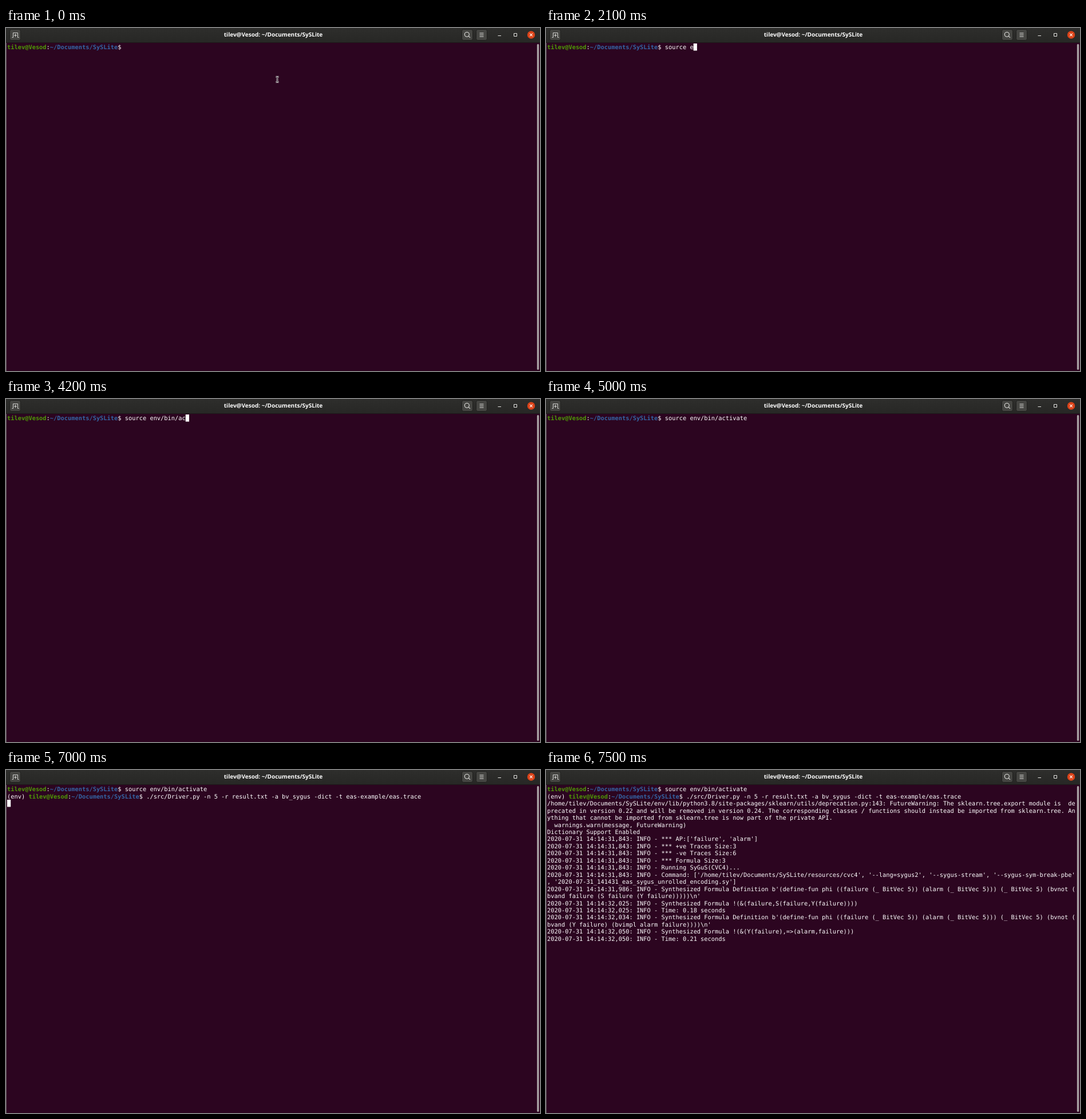
Animation of 933x600 px, one loop 8000 ms. Source, as an HTML page with a canvas:

```html
<!DOCTYPE html>
<html lang="en">
<head>
<meta charset="utf-8">
<title>Terminal</title>
<style>
html, body { margin: 0; width: 100%; height: 100%; overflow: hidden; background: #2c0520; }
canvas { display: block; }
</style>
</head>
<body>
<canvas width="933" height="600"></canvas>
<script>
const ctx = document.querySelector('canvas').getContext('2d');
ctx.textRendering = 'geometricPrecision';

const LOOP = 8000;
const CELL_W = 6.235, CELL_H = 12.46, LEFT = 2, TOP = 27.1, COLUMNS = 148;
const FONT = '10.357px "DejaVu Sans Mono", monospace';
const WHITE = '#ffffff', GREEN = '#4e9a06', BLUE = '#3465a4';

const HOST = 'tilev@Vesod', PATH = '~/Documents/SySLite', HOME = '/home/tilev/Documents/SySLite';
const ACTIVATE = 'source env/bin/activate';
const RUN = './src/Driver.py -n 5 -r result.txt -a bv_sygus -dict -t eas-example/eas.trace';

const info = (time, text) => `2020-07-31 14:14:${time}: INFO - ${text}`;
const start = text => info('31,843', text);
const definition = body => 'Synthesized Formula Definition ' +
  `b'(define-fun phi ((failure (_ BitVec 5)) (alarm (_ BitVec 5))) (_ BitVec 5) (bvnot (bvand ${body}\\n'`;
const wrap = lines => lines.flatMap(line => line.match(new RegExp(`.{1,${COLUMNS}}`, 'g')));

const startLog = wrap([
  HOME + '/env/lib/python3.8/site-packages/sklearn/utils/deprecation.py:143: FutureWarning: ' +
    'The sklearn.tree.export module is  deprecated in version 0.22 and will be removed in version 0.24. ' +
    'The corresponding classes / functions should instead be imported from sklearn.tree. ' +
    'Anything that cannot be imported from sklearn.tree is now part of the private API.',
  '  warnings.warn(message, FutureWarning)',
  'Dictionary Support Enabled',
  start("*** AP:['failure', 'alarm']"),
  start('*** +ve Traces Size:3'),
  start('*** -ve Traces Size:6'),
  start('*** Formula Size:3'),
  start('Running SyGuS(CVC4)...'),
  start(`Command: ['${HOME}/resources/cvc4', '--lang=sygus2', '--sygus-stream', ` +
    "'--sygus-sym-break-pbe', '2020-07-31_141431_eas_sygus_unrolled_encoding.sy']")
]);
const resultLog = wrap([
  info('31,986', definition('failure (S failure (Y failure)))))')),
  info('32,025', 'Synthesized Formula !(&(failure,S(failure,Y(failure))))'),
  info('32,025', 'Time: 0.18 seconds'),
  info('32,034', definition('(Y failure) (bvimpl alarm failure))))')),
  info('32,050', 'Synthesized Formula !(&(Y(failure),=>(alarm,failure)))'),
  info('32,050', 'Time: 0.21 seconds')
]);

// [time in ms, characters typed]
const keystrokes = [
  [400, 1], [500, 2], [800, 3], [1000, 4], [1100, 5], [1300, 7], [2100, 8], [2200, 9], [2400, 11],
  [2700, 12], [3100, 13], [3200, 14], [3500, 15], [4100, 16], [4200, 17], [4500, ACTIVATE.length]
];
const cursorOff = [[0, 100], [1800, 2100], [3800, 4100], [5000, 5500], [5600, 5800], [7500, LOOP]];

function fillRect(color, x, y, w, h) {
  ctx.fillStyle = color;
  ctx.fillRect(x, y, w, h);
}

function stroke(path, color, width = 1) {
  ctx.strokeStyle = color;
  ctx.lineWidth = width;
  ctx.stroke(new Path2D(path));
}

// Places text on the character grid and returns the next column.
function print(row, column, text, color = WHITE, bold = false) {
  ctx.font = (bold ? 'bold ' : '') + FONT;
  ctx.fillStyle = color;
  for (const char of text) {
    if (char !== ' ') ctx.fillText(char, LEFT + column * CELL_W, TOP + row * CELL_H + 10.1);
    column++;
  }
  return column;
}

function prompt(row, prefix, command) {
  let column = print(row, 0, prefix);
  column = print(row, column, HOST, GREEN, true);
  column = print(row, column, ':');
  column = print(row, column, PATH, BLUE, true);
  return print(row, column, '$ ' + command);
}

function button(x) {
  ctx.beginPath();
  ctx.roundRect(x + .5, 2.5, 19, 19, 3);
  ctx.fillStyle = '#454542';
  ctx.fill();
  ctx.strokeStyle = '#1f1f1d';
  ctx.lineWidth = 1;
  ctx.stroke();
}

function drawWindow() {
  fillRect('#2c0520', 0, 0, 933, 600);
  const bar = ctx.createLinearGradient(0, 0, 0, 26);
  bar.addColorStop(0, '#2e2e2c');
  bar.addColorStop(1, '#272725');
  fillRect(bar, 0, 0, 933, 26);
  fillRect('#1d1b1a', 0, 25, 933, 1);
  fillRect('#665b63', 0, 26, 1, 574);

  [6, 796, 821].forEach(button);
  const icon = '#e4e4e1';
  stroke('M10.5 16.5h2v-8h8v8h2M14 12.8h5M16.5 10.3v5', icon, .9);
  stroke('M801.3 11.3a4 4 0 1 0 8 0a4 4 0 1 0 -8 0M808.2 14.2l2.8 2.6', icon, 1.1);
  stroke('M827.5 9h7M827.5 12h7M827.5 15h7', icon);
  stroke('M859.5 13.5h5.5M887.5 9.5h5v5h-5z', icon);

  ctx.fillStyle = '#dc441a';
  ctx.beginPath();
  ctx.arc(917.5, 12, 6.7, 0, 2 * Math.PI);
  ctx.fill();
  stroke('M915.2 9.7l4.6 4.6M919.8 9.7l-4.6 4.6', WHITE, 1.1);

  ctx.font = 'bold 10px "Open Sans", sans-serif';
  ctx.fillStyle = WHITE;
  ctx.textAlign = 'center';
  ctx.fillText(`${HOST}: ${PATH}`, 467, 15.3);
  ctx.textAlign = 'left';

  ctx.fillStyle = '#aaa3a5';
  ctx.beginPath();
  ctx.roundRect(927.8, 28, 3.4, 570, 1.7);
  ctx.fill();
}

function drawPointer() {
  const beam = 'M471.5 85.5h1.5l1 1l1-1h1.5M474 86.5v7M471.5 94.5h1.5l1-1l1 1h1.5';
  stroke(beam, '#c4bdc1', 2.8);
  stroke(beam, '#1c1019', .9);
}

function draw(t) {
  drawWindow();
  if (t < 400) drawPointer();

  const typed = keystrokes.filter(([time]) => time <= t).at(-1)?.[1] ?? 0;
  let row = 0;
  let column = prompt(row, '', ACTIVATE.slice(0, typed));
  if (t >= 5500) column = prompt(++row, '(env) ', t >= 6500 ? RUN : '');
  if (t >= 7000) {
    row++;
    column = 0;
    const log = [...(t >= 7400 ? startLog : []), ...(t >= 7500 ? resultLog : [])];
    for (const line of log) print(row++, 0, line);
  }
  if (!cursorOff.some(([from, to]) => t >= from && t < to)) {
    fillRect(WHITE, LEFT + column * CELL_W, TOP + row * CELL_H, CELL_W, CELL_H);
  }
}

const origin = performance.now();
function tick() {
  draw((performance.now() - origin) % LOOP);
  requestAnimationFrame(tick);
}
tick();
</script>
</body>
</html>
```
